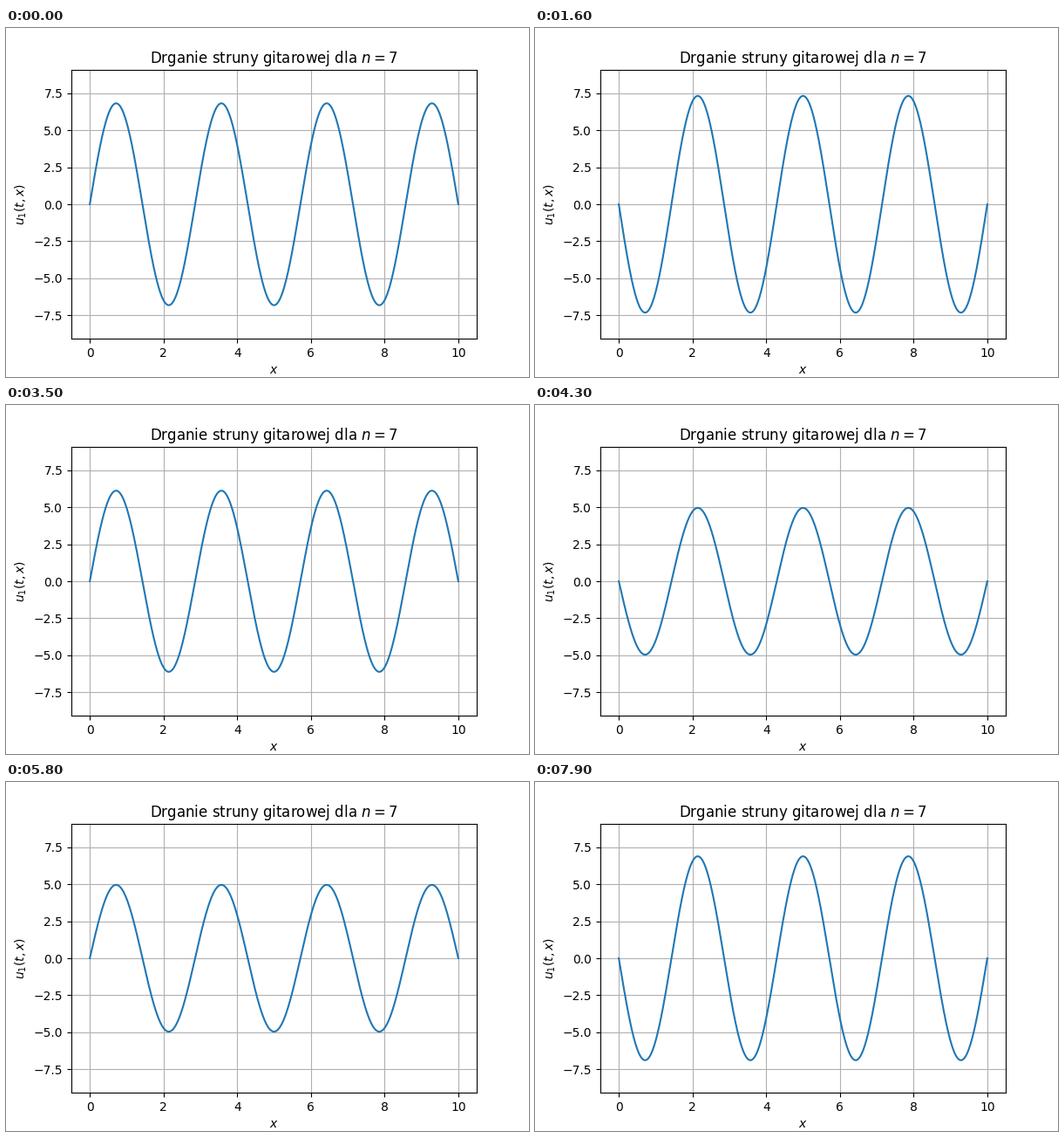
A matplotlib script that plays this animation: 600x400 px, repeating every 8000 ms.

```python
import numpy as np
import matplotlib.pyplot as plt
from matplotlib.animation import FuncAnimation

FRAMES, INTERVAL = 80, 100   # 8 s loop
LENGTH, MODE = 10, 7
AMPLITUDE, PERIOD, PHASE = 7.5, 30, 0.43   # period in frames

x = np.linspace(0, LENGTH, 1000)
shape = np.sin(MODE * np.pi * x / LENGTH)


def string(i):
    return AMPLITUDE * np.cos(2 * np.pi * i / PERIOD - PHASE) * shape


fig, ax = plt.subplots(figsize=(6, 4), dpi=100)
line, = ax.plot(x, string(0))
ax.set_xlim(-0.5, 10.5)
ax.set_ylim(-9.075, 9.075)
ax.set_title(f"Drganie struny gitarowej dla $n={MODE}$")
ax.set_xlabel("$x$")
ax.set_ylabel("$u_1(t,x)$")
ax.grid()


def update(i):
    line.set_ydata(string(i))
    return line,


anim = FuncAnimation(fig, update, frames=FRAMES, interval=INTERVAL,
                     repeat=True, repeat_delay=0)
plt.show()
```
